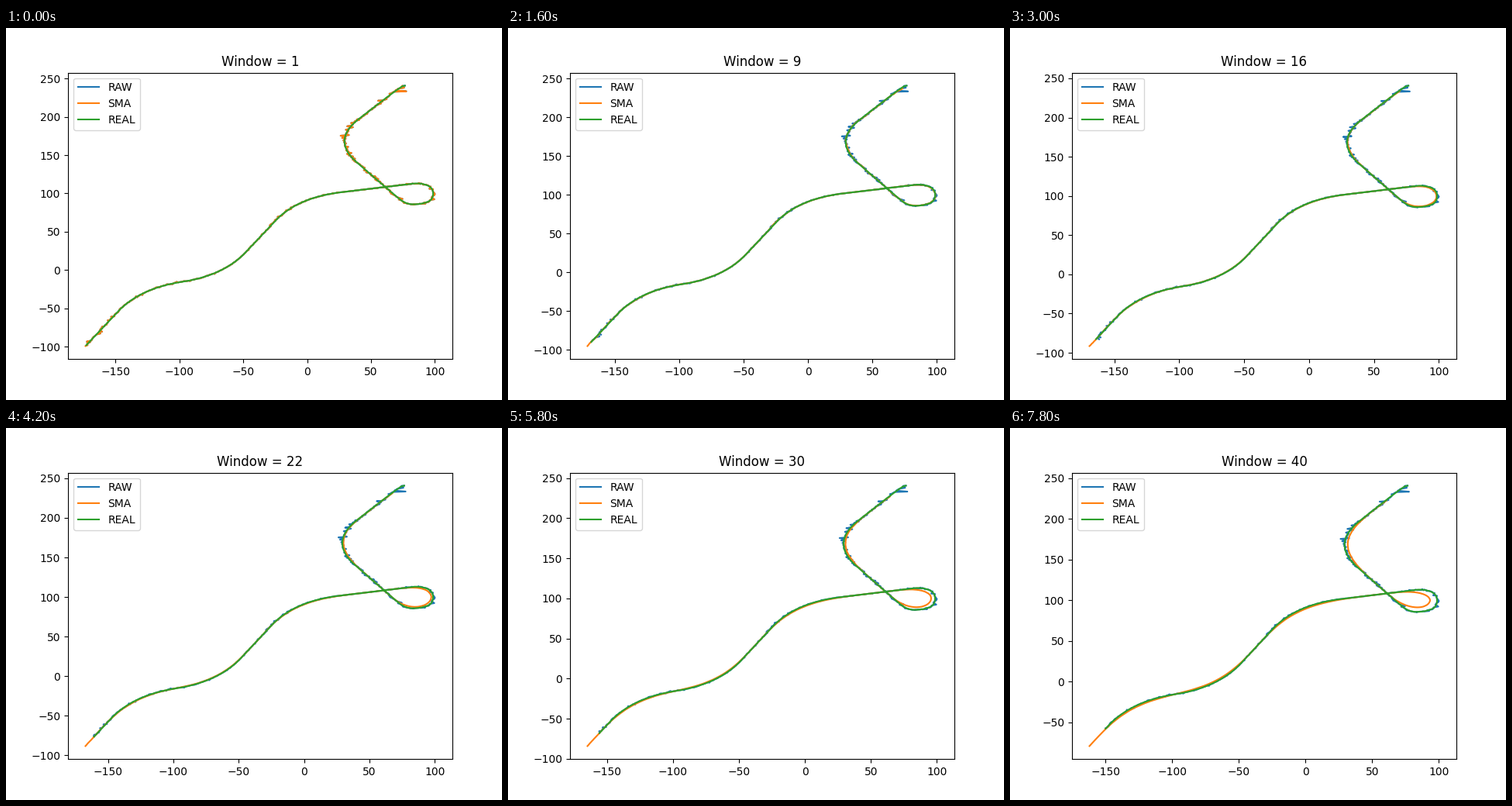
A matplotlib script for the animation above (8 s loop, 640 by 480 pixels).

```python
import numpy as np
import matplotlib.pyplot as plt
from matplotlib.animation import FuncAnimation

WINDOWS = 40
STEP = 1.2   # distance travelled between two samples
BEND = 35    # how far from a corner its bend may start
X_MAX = 100

# Corners of the route: a long S, a small loop, a hook to the top
CORNERS = np.array([
    (-173.5, -99.3), (-130.9, -23.8), (-65.3, -7.2), (-7.7, 94.7),
    (76, 111.4), (88, 114), (98.6, 108), (98.6, 91.5), (89, 85.8),
    (77.5, 85.7), (68, 98.4), (18.9, 169.4), (73, 239.3), (76.5, 240.7),
])


def toward(a, b):
    """Point on the way from a to b where the bend at a ends."""
    gap = np.hypot(*(b - a))
    return a + (b - a) * min(BEND / gap, 0.5)


def rounded(corners):
    """Polyline whose corners are replaced by quadratic curves."""
    t = np.linspace(0, 1, 60)[:, None]
    parts = [corners[:1]]
    for before, c, after in zip(corners, corners[1:], corners[2:]):
        a, b = toward(c, before), toward(c, after)
        parts.append((1 - t) ** 2 * a + 2 * t * (1 - t) * c + t ** 2 * b)
    return np.vstack(parts + [corners[-1:]])


def even_steps(curve):
    d = np.r_[0, np.cumsum(np.hypot(*np.diff(curve, axis=0).T))]
    even = np.linspace(0, d[-1], round(d[-1] / STEP) + 1)
    return np.column_stack([np.interp(even, d, c) for c in curve.T])


def measure(path):
    """Noisy reading of the path; the error grows away from the axes."""
    rng = np.random.default_rng(7)
    x, y = path.T
    raw = path.copy()
    raw[:, 0] += rng.laplace(0, 0.006, len(x)) * np.abs(y)
    raw[:, 1] += rng.laplace(0, 0.003, len(x)) * np.abs(x)
    raw[np.argmax(x), 0] = X_MAX
    raw[[0, -1]] = path[[0, -1]]
    return np.clip(raw, path[0], (X_MAX, path[-1, 1]))


def moving_average(data, w):
    total = np.vstack([np.zeros(2), np.cumsum(data, axis=0)])
    return ((total[w:] - total[:-w]) / w)[:-1]


real = even_steps(rounded(CORNERS))
raw = measure(real)

fig, ax = plt.subplots(figsize=(6.4, 4.8), dpi=100)
raw_line, sma_line, real_line = (
    ax.plot([], [], label=name)[0] for name in ("RAW", "SMA", "REAL"))
ax.legend(loc="upper left")


def draw(frame):
    w = frame + 1
    raw_line.set_data(*raw[w:].T)
    sma_line.set_data(*moving_average(raw, w).T)
    real_line.set_data(*real[w:].T)
    ax.relim()
    ax.autoscale_view()
    ax.set_title(f"Window = {w}")
    return raw_line, sma_line, real_line


anim = FuncAnimation(fig, draw, frames=WINDOWS, interval=200,
                     repeat=True, repeat_delay=0)
plt.show()
```
